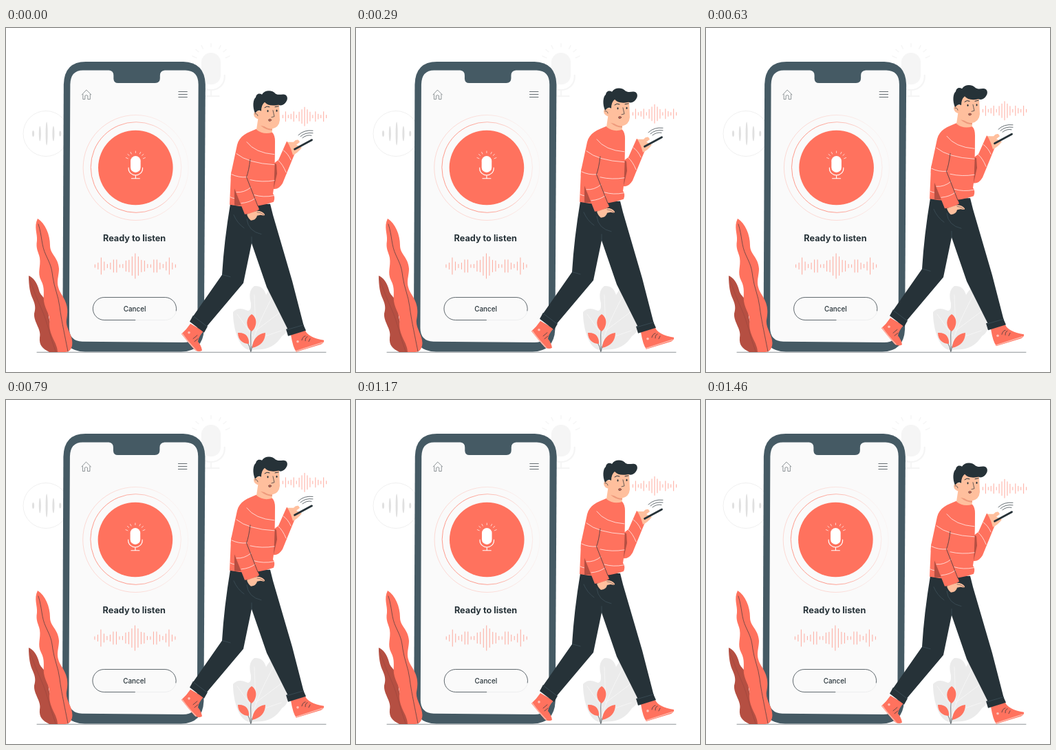
An HTML page that plays this animation: 500x500 px, repeating every 1.5 s.

```html
<!DOCTYPE html>
<html lang="en">
<head>
<meta charset="utf-8">
<title>Voice assistant</title>
<style>
html, body { margin: 0; width: 100%; height: 100%; overflow: hidden; background: #fff; }
svg { display: block; width: 100vw; height: 100vh; }
text { font-family: Inter, sans-serif; text-anchor: middle; fill: #263238; }
.line { fill: none; stroke-linecap: round; stroke-linejoin: round; }
.coral { fill: #ff725e; }
.dark { fill: #263238; }
.skin { fill: #ffbf9d; }
.shade { fill: #b54f42; }
.ink { stroke: #263238; }
</style>
</head>
<body>
<svg viewBox="0 0 500 500">
<defs>
  <g id="mic">
    <rect x="-7.3" width="14.6" height="24" rx="7.3" fill="currentColor"/>
    <path class="line" stroke="currentColor" stroke-width="1.1" d="M-10.2 17V18.5A10.2 9.500 0 0 0 10.200 18.500V17M0 28V32.700M-6 32.700H6"/>
    <path class="line" stroke="currentColor" stroke-width=".7" d="M0 -7V-4.500M-7.300 -5.500L-6 -3M7.300 -5.500L6 -3M-14 2.500L-11 3.800M14 2.500L11 3.800M-11.500 -2.500L-9.300 -.700M11.500 -2.500L9.300 -.700"/>
  </g>
  <linearGradient id="fade" x1="0" x2="1" y1=".6" y2=".4">
    <stop offset=".35" stop-color="#ff725e"/>
    <stop offset="1" stop-color="#ff725e" stop-opacity=".15"/>
  </linearGradient>
</defs>

<!-- Backdrop -->
<use href="#mic" transform="translate(298 36) scale(1.93)" color="#f5f5f5"/>
<circle cx="58" cy="153.500" r="33" fill="none" stroke="#ebebeb" stroke-width=".8"/>
<g id="badge" fill="#e0e0e0"></g>
<path fill="#ebebeb" d="M354 468C339 466 330 438 330 413Q337 405 349 410Q357 414 356 400Q351 382 361 375Q374 374 378 388Q388 370 395 380Q394 396 400 399Q414 399 413 409Q404 418 408 428Q413 440 401 448Q390 465 372 467Z"/>
<path class="line" stroke="#fafafa" stroke-width=".7" d="M356 468Q362 435 392 382M363 440L361 388M359 448L336 416M364 439L407 407M359 454L400 440"/>
<path class="line" stroke="#5d686d" stroke-width=".7" d="M45 471.300H465"/>

<g id="phone">
  <path fill="#455a64" d="M84 82Q85 49 116 49H258Q289 50 290 82L288 438Q286.500 470 255 470.500H115Q83 470 82.500 438Z"/>
  <path fill="#fafafa" d="M93.500 82Q94 61.500 112 61.500H150Q156.500 62 156.500 69V74Q157 80 163 80H217Q224 80 224 73V69Q224 62 231 61.500H261Q279.800 62 279.800 82L278.500 437Q277.500 457 258 457L111 455.800Q92 455 92 436Z"/>
  <path class="line ink" stroke-width=".5" d="M110.500 97L117 90L124 97M112 96.500V103.500H115V98.500Q117 96.500 119 98.500V103.500H122.500V96.500"/>
  <path class="line ink" stroke-width=".7" d="M251 92.500H263.500M251 96.500H263.500M251 100.500H263.500"/>
  <circle cx="188.800" cy="203" r="76.500" fill="none" stroke="url(#fade)" stroke-width=".7" opacity=".35"/>
  <circle cx="189.200" cy="202.500" r="65.800" fill="none" stroke="url(#fade)" stroke-width=".7"/>
  <circle class="coral" cx="188.500" cy="203" r="54.300"/>
  <use href="#mic" x="188.500" y="186" color="#fff"/>
  <text x="186.800" y="310" font-size="12.700" font-weight="700">Ready to listen</text>
  <path id="screenWave" class="line" stroke="#ff725e" stroke-width=".6" transform="translate(188 346)"/>
  <rect x="126.500" y="391.500" width="121.500" height="33" rx="16.500" fill="none" stroke="#e8eaeb" stroke-width=".7"/>
  <path class="line ink" stroke-width=".7" d="M188 424.500H143A16.500 16.500 0 0 1 143 391.500H231.500A16.500 16.500 0 0 1 247.500 411"/>
  <text x="187.200" y="411.500" font-size="9.900" font-weight="500">Cancel</text>
</g>

<!-- Plants -->
<path class="shade" d="M33 360C40 363 45 370 48 381C50 391 62 394 62 408C61 421 63 426 69 437C75 448 79 457 82 471H63C53 466 48 461 49 450C52 438 40 428 41 415C43 408 43 403 39 394C35 386 33 375 33 360Z"/>
<path class="line" stroke="#93423a" stroke-width=".5" d="M34 364Q44 392 51 407T65 449L72 470"/>
<path class="coral" d="M46 277C57 284 64 300 64 316C64 329 76 333 77 350C77 363 71 370 80 386C89 400 91 408 88 424C86 437 99 448 96 462Q94 471 86 471H75C75 458 63 448 63 430C65 416 57 411 55 397C54 387 57 378 51 367C45 355 51 347 49 334C47 325 43 321 45 309C46 299 40 289 46 277Z"/>
<path class="line ink" stroke-width=".6" d="M47 285C53 304 51 315 58 330S66 347 68 362S76 389 78 405S83 435 90 470"/>
<path class="line ink" stroke-width=".6" d="M357 422Q355 448 356 470M339 446Q354 455 355.500 470M374 446Q358 454 356 470"/>
<path class="coral" d="M357 416C366 421 365 435 357 441C348 435 348 422 357 416ZM337 443C348 442 354 449 353 459C344 459 337 453 337 443ZM377 443C377 455 370 462 358 465C358 453 366 444 377 443Z"/>

<g id="walker">
  <path id="voiceWave" class="line" stroke="#ff725e" stroke-width=".6" transform="translate(434 129)"/>

  <!-- Shoes -->
  <path class="coral" d="M268 430L287 441Q280 449 279 456Q284 462 285 469Q280 472 274 468L255 445Q262 439 268 430ZM414 446L435 440Q439 450 462 454Q463 457 458 460L422 471Q417 465 414 446Z"/>
  <path class="line" stroke="#ffb5a8" stroke-width="1.600" d="M256.500 445Q264 456 276 468.500M421.500 470L460 457.500"/>
  <circle cx="266" cy="443" r="1.800" fill="#ffc3ba"/><circle cx="424" cy="456" r="1.800" fill="#ffc3ba"/>
  <path class="line ink" stroke-width=".7" d="M272 452L278 447M274 456L279 452M430 454Q431 449 435 448M435 455Q435 450 438 449M440 456L442 452"/>

  <!-- Trousers -->
  <path class="dark" d="M326 256H384L388 272L416 368L433 434L411 441L379 377L357 313L345 371L291 435L270 422L314 359Q317 310 326 256Z"/>
  <path class="dark" d="M272 418L293 434L288 443L267 427ZM407 438L432 431L436 440L410 448Z"/>
  <path class="line" stroke="#455a64" stroke-width=".6" d="M272 419L292 434M408 439L432 432M331 272Q336 284 346 291M350 278Q352 296 371 300M357 304L357 314M315 359L326 362"/>

  <!-- Far arm and phone -->
  <path class="coral" d="M388 198L396 192L408 165Q417 171 420 182L402 226Q396 236 388 234Z"/>
  <path class="shade" d="M388 196L393 198L394 212L389 234L386 234Z"/>
  <path class="skin" d="M409 166L418 166Q421 162 425 163L427 166L422 170L430 174Q424 182 417 185Q414 174 409 166Z"/>
  <path class="line" stroke="#fff" stroke-width=".7" d="M403 178Q410 183 414 192M396 193Q402 198 407 210"/>
  <path class="line ink" stroke-width="2.800" d="M419.500 176.500L444.500 163"/>
  <path class="line ink" stroke-width=".7" d="M425 156Q433 148 446 149.500M428 158Q435 151.500 446 153M431 160Q437 155 444 156.500"/>

  <!-- Sweater -->
  <path class="coral" d="M364 147C351 152 339 157 336 170L327 212L325 257Q358 264 389 253Q392 246 388 241L389 234Q391 205 391 165Q391 156 387 152Z"/>
  <path class="line" stroke="#fff" stroke-width=".7" d="M350 166Q362 182 390 184M335 183Q352 197 390 199M355 221Q372 225 390 222M361 243Q374 247 389 244M326 246Q331 249 339 248"/>
  <path class="shade" d="M332 222L332 258H342L346 254Z"/>
  <path class="coral" d="M328 208Q325 220 329 226L347 271Q359 270 368 264L350 217L352 207Z"/>
  <path class="line" stroke="#fff" stroke-width=".7" d="M328 213Q338 218 350 217M335 239Q346 240 356 232M342 255Q354 254 362 248"/>
  <path class="line ink" stroke-width=".7" d="M355 191Q353 208 349.500 217L366 259"/>
  <path class="skin" d="M350 271L365 266Q372 266 376 271Q377 274 370 272L365 273Q364 279 356 280Q352 277 350 271Z"/>
  <path class="line ink" stroke-width=".5" d="M365 268Q370 268 375 272"/>

  <!-- Head -->
  <path class="skin" d="M367 128L364 148Q374 156 387 152L386 145Z"/>
  <path fill="#ee9a7c" d="M370 142Q378 149 387 149L387 146Z"/>
  <path class="skin" d="M369 110Q383 104 397 110L398 134Q397 145 386 147Q373 146 369 133Q360 132 360 125Q362 119 369 121Z"/>
  <path class="dark" d="M362 124C358 115 359 104 363 101C364 95 369 95 372 97C376 90 387 90 392 96C398 99 402 95 407 98C411 102 408 108 404 111Q400 114 396 112Q382 115 376 108Q371 112 371 121Q368 119 365 121Z"/>
  <path class="line ink" stroke-width="1" d="M376 116Q379 113 383 115M391 115L396 114"/>
  <ellipse class="dark" cx="380.500" cy="121" rx="1" ry="1.600"/><ellipse class="dark" cx="393.500" cy="120.500" rx="1" ry="1.600"/>
  <path class="line ink" stroke-width=".7" d="M388 120L390 129L386 130M362 125Q365 124 366 128"/>
  <path fill="#c9614f" class="ink" stroke-width=".5" d="M381.500 133.500Q384 131.500 386 134Q385 136.500 382 135.500Z"/>
</g>
</svg>
<script>
const byId = id => document.getElementById(id);

// Vertical bars mirrored about the tallest one
function drawWave(id, step, heights) {
  let d = '';
  for (let i = 1 - heights.length; i < heights.length; i++) {
    const h = heights[Math.abs(i)];
    d += `M${i * step} ${-h / 2}v${h}`;
  }
  byId(id).setAttribute('d', d);
}
drawWave('screenWave', 4.5, [36, 27, 17, 15, 5, 4, 18, 18, 9, 5, 12, 24, 9, 4]);
drawWave('voiceWave', 3.95, [27, 20, 13, 4, 14, 7, 4, 14, 4]);

byId('badge').innerHTML = [9, 22, 34, 22, 8].map((h, i) =>
  `<ellipse cx="${39.5 + i * 9.8}" cy="153.5" rx="1.5" ry="${h / 2}"/>`).join('');

const DURATION = 1500, LEAD = 23;
const shake = [0, -1, 2, -4, 4, -4, 4, -4, 2, -1, 0];

function frame(now) {
  const p = (now + LEAD) % DURATION / DURATION;
  const i = Math.floor(p * 10), k = p * 10 - i;
  const x = shake[i] + (shake[i + 1] - shake[i]) * k;
  const y = -10 * (1 - Math.abs(2 * p - 1));
  byId('phone').setAttribute('transform', `translate(${x} 0)`);
  byId('walker').setAttribute('transform', `translate(0 ${y})`);
}

const start = performance.now();
function tick() {
  frame(performance.now() - start);
  requestAnimationFrame(tick);
}
tick();
</script>
</body>
</html>
```
